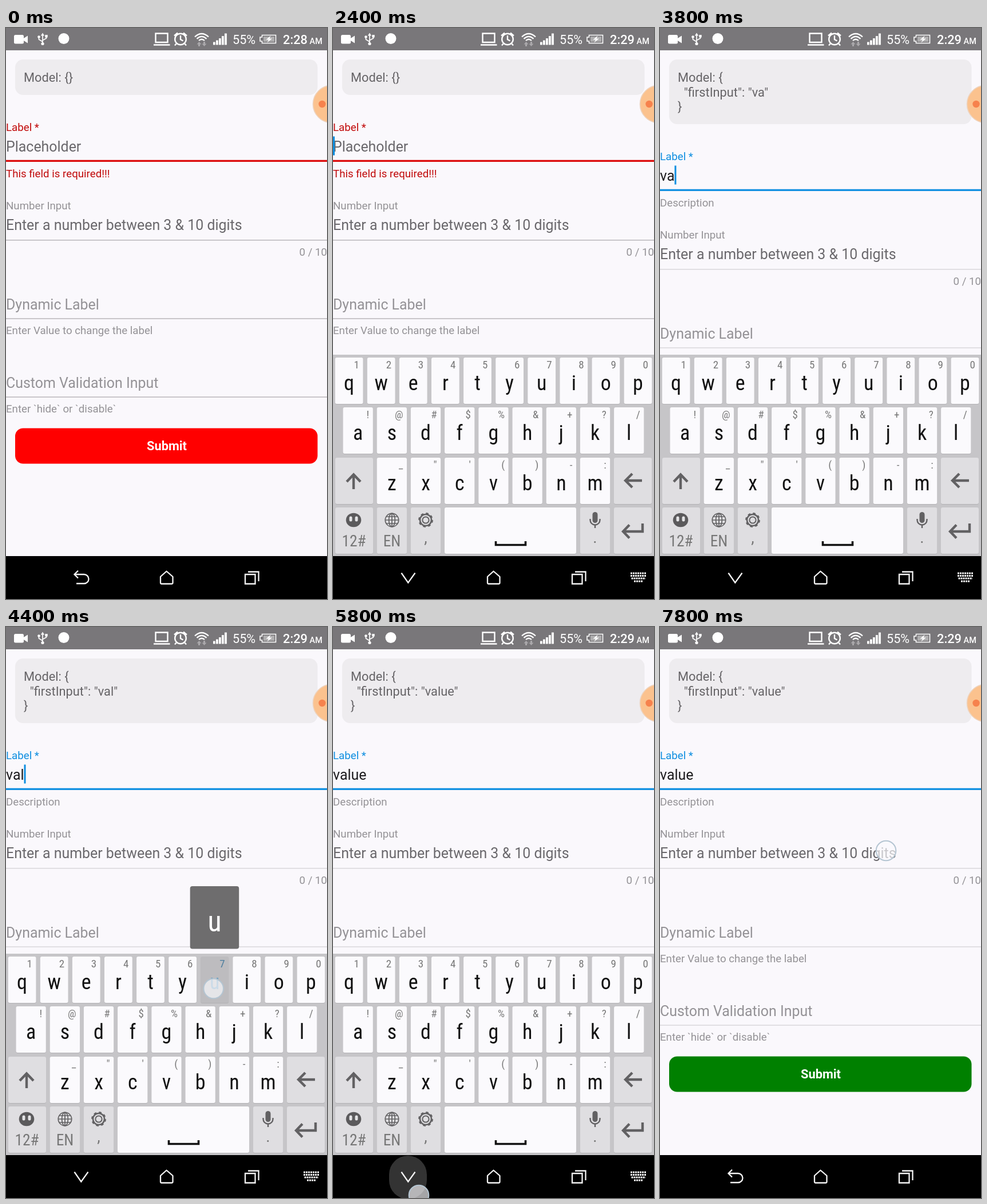
Recreate the animation shown at these times as an HTML page. Size 561 by 998 pixels, loop 8000 ms.

```html
<!DOCTYPE html>
<html lang="en">
<head>
<meta charset="utf-8">
<title>Form demo</title>
<style>
  html, body { margin: 0; width: 100%; height: 100%; overflow: hidden; background: #faf8fc; }
  svg { display: block; width: 100%; height: 100%; font-family: Roboto, sans-serif; }
  text { white-space: pre; }
  .s { font-size: 18.7px; }
  .m { font-size: 21.8px; }
  .l { font-size: 24.93px; }
  .mid { text-anchor: middle; }
  .end { text-anchor: end; }
  .mute { fill: #949296; }
  .hint { fill: #6a686c; }
  .key { font: 36px "Roboto Condensed", Roboto, sans-serif; font-stretch: condensed; text-anchor: middle; }
  .alt { font: 19px "Roboto Condensed", Roboto, sans-serif; font-stretch: condensed; text-anchor: end; }
  .fn { font-size: 27.5px; fill: #777; }
  .o { fill: none; stroke: currentColor; }
</style>
</head>
<body>
<svg viewBox="0 0 561 998" preserveAspectRatio="none">
  <rect width="561" height="998" fill="#faf8fc"/>

  <rect id="card" x="16" y="55" width="528.5" rx="14" fill="#eeecef"/>
  <g class="m" fill="#666467">
    <text id="model0" x="31" y="94"></text>
    <text id="model1" x="31" y="119.5"></text>
    <text id="model2" x="31" y="145"></text>
  </g>

  <g id="form">
    <text id="label" class="s" y="179.5">Label *</text>
    <text id="value" class="l" y="215.5"></text>
    <rect id="caret" y="189.5" width="3" height="33" fill="#0d8ee0"/>
    <rect id="bar" y="230.7" width="561" height="3.2"/>
    <text id="note" class="s" y="260.5"></text>

    <text class="s mute" y="316.5">Number Input</text>
    <text class="l hint" y="352.5">Enter a number between 3 &amp; 10 digits</text>
    <text class="s mute end" x="561" y="398">0 / 10</text>
    <text class="l mute" y="491.5">Dynamic Label</text>
    <text class="s mute" y="535">Enter Value to change the label</text>
    <text class="l mute" y="628.5">Custom Validation Input</text>
    <text class="s mute" y="672">Enter `hide` or `disable`</text>
    <path id="rules" d="M0 370.7H561M0 508H561M0 645H561" stroke-width="1.4"/>

    <rect id="button" x="16" y="699.5" width="528.5" height="62" rx="14"/>
    <text class="m mid" x="281" y="738" fill="#fff" font-weight="700">Submit</text>
  </g>

  <g>
    <circle cx="569" cy="133" r="32.5" fill="#fbc28e" stroke="#eed3bd" stroke-width="1.6"/>
    <circle cx="552.5" cy="133" r="6.2" fill="#f6824d"/>
  </g>

  <g id="keyboard">
    <rect y="571" width="561" height="352" fill="#c6c5c8"/>
    <g id="keys"></g>
    <g color="#626163" stroke-width="4.4">
      <path class="o" d="M36 806V780M24 793L36 780.5L48 793"/>
      <path class="o" d="M540 791H511M523 779L511 791L523 803"/>
      <path class="o" d="M541 866V880H507M518 868.5L507 880L518 891.5"/>
    </g>
    <ellipse cx="36" cy="860" rx="13.3" ry="12.2" fill="#5b5a5c"/>
    <path d="M31 856v4M41 856v4" stroke="#e4e4e6" stroke-width="5" stroke-linecap="round"/>
    <g class="o" color="#626163" stroke-width="1.7">
      <circle cx="103" cy="860" r="11.7"/>
      <ellipse cx="103" cy="860" rx="5.4" ry="11.7"/>
      <path d="M91 860H115M103 848V872M93 854H113M93 866H113"/>
      <circle cx="162" cy="860" r="10" stroke-width="2.6"/>
      <circle cx="162" cy="860" r="5.6" stroke-width="2"/>
      <circle cx="162" cy="860" r="11.8" stroke-width="2.2" stroke-dasharray="4.6 4.67"/>
      <path d="M449.500 858v2a8.500 8.500 0 0 0 17 0v-2M458 868.500V874" stroke-width="2.4"/>
    </g>
    <rect x="453.500" y="846" width="9" height="19" rx="4.500" fill="#626163"/>
    <path class="o" color="#111" d="M284.500 897V903.500H336.500V897" stroke-width="3.6"/>
    <g class="key fn">
      <text class="key fn" x="36.500" y="906" style="font-size:27.5px">12#</text>
      <text class="key fn" x="103" y="906" style="font-size:27.5px">EN</text>
      <text class="key fn" x="162" y="900" style="font-size:27.5px">,</text>
      <text class="key fn" x="458" y="900" style="font-size:27.5px">.</text>
    </g>
  </g>

  <g id="popup">
    <rect id="popBox" y="453" width="85.5" height="109.5" rx="4" fill="#6e6d6e"/>
    <text id="popText" class="key" fill="#fff" style="font-size:50px"></text>
  </g>

  <g id="status" color="#fff" fill="#fff">
    <rect width="561" height="39" fill="#79777a"/>
    <rect x="14" y="12" width="17" height="15.500" rx="2.500"/>
    <path d="M30 18.500L38 13.500V26.500L30 21.500Z"/>
    <path class="o" d="M64 11V27M64 24L57.500 20V16M64 21.500L70.500 18V14.500" stroke-width="1.7"/>
    <path d="M60.800 13.500L64 8.500L67.200 13.500ZM68.300 12h4.400v4.400h-4.400Z"/>
    <circle cx="64" cy="27.500" r="2.6"/><circle cx="57.500" cy="15.500" r="2.3"/>
    <circle cx="101" cy="18.500" r="9.500"/>
    <path class="o" d="M261.500 9.500H282.500V25H261.500ZM258 29.500H286.500" stroke-width="2.4"/>
    <g class="o" stroke-width="2.4">
      <circle cx="305" cy="19.500" r="9.800"/>
      <path d="M305 13V20L309.500 22.500M294 13.500L300 8.500M316 13.500L310 8.500M298 27l-3 3.500M312 27l3 3.500"/>
    </g>
    <path class="o" d="M330 15.500Q342 4.500 354 15.500M333.500 18.800Q342 11 350.500 18.800M337 22Q342 17.500 347 22" stroke-width="2.3"/>
    <path d="M337.500 24l4 4.500h-2.500v3.500h-3v-3.500h-2.500ZM346.500 32l4-4.500h-2.500V24h-3v3.500h-2.500Z" fill="#aaa8ab"/>
    <path d="M362 24.500h3.800v5H362ZM367 21.500h3.800v8H367ZM372 18h3.800v11.500H372ZM377 14h3.800v15.500H377ZM382 9.500h3.900v20H382Z"/>
    <text x="396" y="28" font-size="21.6">55%</text>
    <path class="o" d="M447.500 12.500H471.500V26.500H447.500V23H444V16H447.500Z" stroke-width="1.6"/>
    <path d="M450 15h19v9h-19Z" opacity=".4"/>
    <path d="M462.500 13.500L454.500 20.500H459L456.500 25.500L465 18.500H460.500Z"/>
    <text id="clock" x="484" y="27.700" font-size="21.8" font-weight="500"></text>
    <text x="530.500" y="27.700" font-size="14.5" font-weight="500">AM</text>
  </g>

  <rect y="923" width="561" height="75"/>
  <rect id="ripple" x="98" y="924" width="66" height="76" rx="33" fill="#333"/>
  <g class="o" color="#f4f4f4" stroke-width="2.3">
    <path id="back" d="M126 948.500L119.500 955L126 961.500M120 955H136.500A7.800 7.800 0 0 1 136.500 971H123"/>
    <path id="down" d="M119.500 952.500L131.300 969.500L143.500 952.500"/>
    <path d="M270 959L280.500 949.500L291.500 959V969.500Q291.500 971.500 289.500 971.500H272Q270 971.500 270 969.500Z" stroke-linejoin="round"/>
    <path d="M418 955H435.500V971.500H418ZM423 950.500H441.500V967"/>
    <path id="ime" d="M520 953H547M520 957.500H547M521.500 962H546M526 967H541" stroke-width="2.8" stroke-dasharray="3 1"/>
  </g>
  <circle id="touch" r="17.300" fill="#fbfafd" fill-opacity=".66" stroke="#b4c5d2" stroke-width="2"/>
</svg>
<script>
const $ = id => document.getElementById(id);
const LOOP = 8000, STEP = 200;
const RED = "#c10a0a", BLUE = "#0d8ee0";
const keys = {};

function add(parent, tag, attrs, text) {
  const el = document.createElementNS(parent.namespaceURI, tag);
  for (const name in attrs) el.setAttribute(name, attrs[name]);
  if (text) el.textContent = text;
  return parent.appendChild(el);
}

function addKey(x, y, w, fill) {
  const h = 81;
  add($("keys"), "rect", { x, y: y + 1, width: w, height: h, rx: 3, fill: "#b3b2b5" });
  return add($("keys"), "rect", { x, y, width: w, height: h, rx: 3, fill });
}

function addRow(chars, hints, x0, pitch, w, y) {
  [...chars].forEach((c, i) => {
    const x = x0 + i * pitch, box = addKey(x, y, w, "#fbfafd");
    const alt = add($("keys"), "text", { class: "alt", x: x + w - 6.5, y: y + 19 }, hints[i]);
    const text = add($("keys"), "text", { class: "key", x: x + w / 2, y: y + 57 }, c);
    keys[c] = { x: x + w / 2, y: y + 41, top: y, box, alt, text };
  });
}

addRow("qwertyuiop", "1234567890", 3.7, 56.1, 48.8, 576);
addRow("asdfghjkl", "!@#$%&+?/", 17.5, 59.2, 52.3, 663);
addRow("zxcvbnm", "_\"'()-:", 76.7, 59.2, 52.3, 751);
const GREY = "#dfdee1";
for (const [x, w] of [[4, 66], [491, 66]]) {
  addKey(x, 751, w, GREY);
  addKey(x, 838, w, GREY);
}
for (const x of [76.7, 135.9, 431.900]) addKey(x, 838, 52.3, GREY);
addKey(195, 838, 230, "#fbfafd");

// [character, press, release]; the character is typed on release
const strokes = [["v", 2800, 3000], ["a", 3400, 3600], ["l", 4000, 4200], ["u", 4400, 4600], ["e", 4800, 5000]];
// [x, y, from, to]
const taps = [[131, 210, 800, 1200], [150, 993, 5600, 6000], [395, 391, 7800, 8000]];

const within = (t, a, b) => t >= a && t < b;
const show = (id, on) => $(id).setAttribute("display", on ? "inline" : "none");
const set = (id, name, v) => $(id).setAttribute(name, v);
const write = (id, s) => { if ($(id).textContent !== s) $(id).textContent = s; };

function caretOn(t) {
  if (t < 1200) return false;
  if (t < 2800) return !within(t, 1800, 2400);
  if (t < 5100) return true;
  return (t - 5100) % 1000 < 500;
}

function drawForm(t, typed) {
  const filled = typed !== "";
  set("card", "height", filled ? 113 : 62);
  write("model0", filled ? "Model: {" : "Model: {}");
  write("model1", filled ? `  "firstInput": "${typed}"` : "");
  write("model2", filled ? "}" : "");
  set("form", "transform", `translate(0 ${filled ? 51 : 0})`);
  set("label", "fill", filled ? BLUE : RED);
  set("bar", "fill", filled ? BLUE : "#dc0606");
  write("value", typed || "Placeholder");
  set("value", "fill", filled ? "#1c1b1d" : "#6a686c");
  write("note", filled ? "Description" : "This field is required!!!");
  set("note", "fill", filled ? "#949296" : RED);
  set("rules", "stroke", filled ? "#d9d7db" : "#b9b7bb");
  set("button", "fill", filled ? "#008000" : "#ff0000");
  show("caret", caretOn(t));
  set("caret", "x", filled ? $("value").getComputedTextLength() : 0);
}

function drawKeyboard(t, pressed) {
  const p = t < 4000 ? (t - 1400) / 400 : (6200 - t) / 400;
  const open = Math.max(0, Math.min(1, p));
  show("keyboard", open > 0);
  set("keyboard", "opacity", open);
  set("keyboard", "transform", `translate(0 ${(1 - open) * 70})`);
  for (const c in keys) {
    const on = c === pressed, k = keys[c];
    k.box.setAttribute("fill", on ? "#bdbcbf" : "#fbfafd");
    k.text.setAttribute("fill", on ? "#6f9fbf" : "#111");
    k.alt.setAttribute("fill", on ? "#4f7f9f" : "#777");
  }
  show("popup", pressed);
  if (pressed) {
    const k = keys[pressed];
    const x = Math.max(43, Math.min(518, k.x));
    set("popBox", "x", x - 43);
    set("popBox", "y", k.top - 123);
    set("popText", "x", x);
    set("popText", "y", k.top - 44);
    write("popText", pressed);
  }
}

function drawNav(t) {
  const up = within(t, 1200, 6000);
  show("back", !up);
  show("down", up);
  show("ime", up);
  show("ripple", within(t, 5600, 6000));
}

function draw(time) {
  const t = Math.floor(time % LOOP / STEP) * STEP;
  const typed = strokes.filter(s => t >= s[2]).map(s => s[0]).join("");
  const stroke = strokes.find(s => within(t, s[1], s[2]));
  const key = stroke && keys[stroke[0]];
  const tap = key ? [key.x - 2, key.y + 15] : taps.find(a => within(t, a[2], a[3]));
  write("clock", t < 200 ? "2:28" : "2:29");
  drawForm(t, typed);
  drawKeyboard(t, stroke && stroke[0]);
  drawNav(t);
  show("touch", tap);
  if (tap) {
    set("touch", "cx", tap[0]);
    set("touch", "cy", tap[1]);
  }
}

const start = performance.now();
function tick() {
  draw(performance.now() - start);
  requestAnimationFrame(tick);
}
tick();
</script>
</body>
</html>
```
